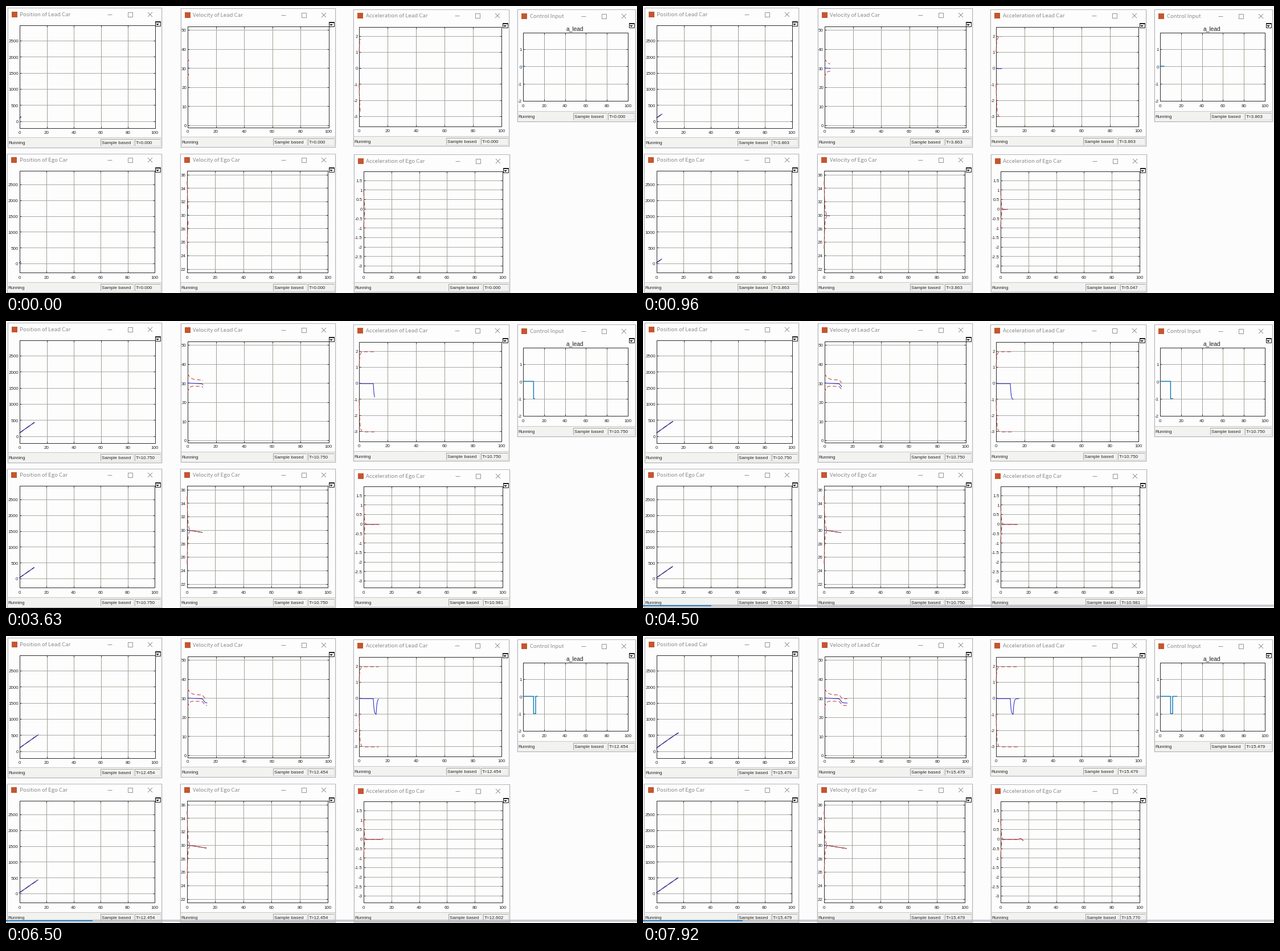
Animation of 1108x505 px, one loop 8000 ms. Source, as a matplotlib script:

```python
import numpy as np
import matplotlib.pyplot as plt
from matplotlib.animation import FuncAnimation
from matplotlib.collections import LineCollection
from matplotlib.patches import Polygon, Rectangle

W, H, DPI = 1108, 505, 100
STEP_MS, FRAMES = 80, 100
PX = 72 / DPI
SANS, UI = "Liberation Sans", "Noto Sans CJK JP"
BLUE, RED, TEAL = "#3432c4", "#c0483f", "#1f7fb8"

plt.rcParams["path.simplify"] = False
fig = plt.figure(figsize=(W / DPI, H / DPI), dpi=DPI, facecolor="#fcfcfd")
ax = fig.add_axes([0, 0, 1, 1])
ax.set_xlim(0, W)
ax.set_ylim(H, 0)
ax.axis("off")


def rect(x0, y0, x1, y1, face="none", edge="none", width=1, z=1, alpha=1):
    patch = Rectangle((x0, y0), x1 - x0, y1 - y0, fc=face, ec=edge,
                      lw=width * PX, zorder=z, alpha=alpha)
    return ax.add_patch(patch)


def text(x, y, label, size=8, color="#262626", ha="left", font=SANS):
    """Write a label with its capitals centred on y."""
    return ax.text(x, y + 0.36 * size, label, size=size * PX, color=color,
                   ha=ha, va="baseline", family=font, zorder=4)


def strokes(segments, color, width=1, z=2):
    ax.add_collection(LineCollection(segments, colors=color,
                                     linewidths=width * PX, zorder=z))


class Scope:
    """One scope window: frame, title bar, plot grid and status bar."""

    def __init__(self, title, frame, plot, ticks, title_y, label_y, status):
        x0, y0, x1, y1 = frame
        self.left, top, self.right, bottom = plot
        first, self.step, count, self.first_y, self.dy = ticks
        self.first = first
        self.draw_frame(title, frame, title_y)

        xs = np.linspace(self.left, self.right, 6)
        ys = self.first_y + self.dy * np.arange(count)
        strokes([[(x, top), (x, bottom)] for x in xs[1:-1]], "#96968a", 0.9)
        strokes([[(self.left, y), (self.right, y)] for y in ys], "#a0a098", 0.9)
        strokes([[(x, e), (x, e + d)] for x in xs
                 for e, d in ((top, 3), (bottom, -3))], "#303030")
        strokes([[(e, y), (e + d, y)] for y in ys
                 for e, d in ((self.left, 3), (self.right, -3))], "#303030")
        rect(self.left, top, self.right, bottom, edge="#2c2c2c", z=3)
        for i, x in enumerate(xs):
            text(x, label_y, str(20 * i), ha="center")
        for i, y in enumerate(ys):
            text(self.left - 2, y + 0.5, f"{first + i * self.step:g}", ha="right")

        status_y, sample_x, time_x = status
        rect(x0 + 0.5, status_y - 9, x1 - 0.5, y1 - 0.5, "#f2f2f0")
        strokes([[(x0, status_y - 9), (x1, status_y - 9)]], "#c8c8c4")
        for a, b in ((sample_x - 2, time_x - 4), (time_x - 2, x1 - 2)):
            strokes([[(a, status_y + 6), (a, status_y - 6), (b, status_y - 6)]],
                    "#a4a4a8")
            strokes([[(b, status_y - 6), (b, status_y + 6), (a, status_y + 6)]],
                    "#dcdcd8")
        text(x0 + 1, status_y, "Running")
        text(sample_x, status_y, "Sample based")
        self.clock = text(time_x, status_y, "")
        self.traces = []

    def draw_frame(self, title, frame, y):
        x0, y0, x1, y1 = frame
        rect(x0 - 1, y0, x1 + 2, y1 + 2, "#ececee")
        rect(x0, y0, x1 + 1, y1 + 1, "#dadade")
        rect(x0, y0, x1, y1, "#fdfdfd", "#b4b4ba")
        rect(x0 + 7, y - 5, x0 + 17, y + 5, "#c4562f")
        text(x0 + 21.5, y, title, 9.6, "#8c8c8c", font=UI)
        minimise, maximise, close = x1 - 91, x1 - 55.5, x1 - 20
        strokes([[(minimise - 4, y), (minimise + 4, y)],
                 [(close - 4, y - 4), (close + 4, y + 4)],
                 [(close - 4, y + 4), (close + 4, y - 4)]], "#8a8a8a", 0.9)
        rect(maximise - 4, y - 4, maximise + 4, y + 4, edge="#8a8a8a", width=0.9)
        cx, cy = x1 - 7, y0 + 28
        rect(cx - 4.5, cy - 4, cx + 4.5, cy + 4, "white", "#1c1c1c", z=4)
        rect(cx - 4.5, cy - 4, cx + 4.5, cy - 2, "#1c1c1c", z=5)
        arrow = [(cx - 3, cy), (cx + 3, cy), (cx, cy + 3)]
        ax.add_patch(Polygon(arrow, fc="#1c1c1c", lw=0, zorder=5))

    def add(self, values, color, width=1.1, dashed=False):
        x = self.left + (self.right - self.left) * TIME / 100
        y = self.first_y + (values - self.first) / self.step * self.dy
        style = (0, (6, 3.5)) if dashed else "-"
        line, = ax.plot([], [], color=color, lw=width * PX, ls=style, zorder=3.5)
        self.traces.append((line, x, y))

    def show(self, now, clock):
        for line, x, y in self.traces:
            line.set_data(np.interp(np.append(TIME[TIME < now], now), TIME, x),
                          np.interp(np.append(TIME[TIME < now], now), TIME, y))
        self.clock.set_text(f"T={clock:.3f}")


# Simulated signals: the lead car brakes for two seconds.
DT = 0.02
TIME = np.arange(0, 17, DT)


def settle(start, end, tau):
    return end + (start - end) * np.exp(-TIME / tau)


def lagged(at, tau=0.5):
    return 1 - np.exp(-np.maximum(TIME - at, 0) / tau)


command = -((TIME >= 10) & (TIME < 12)).astype(float)
lead_acc = settle(0, -0.04, 0.5) - lagged(10) + lagged(12)
lead_vel = 30 + np.cumsum(lead_acc) * DT
lead_pos = 100 + np.cumsum(lead_vel) * DT
ego_vel = 30 - 0.033 * TIME
ego_pos = 20 + np.cumsum(ego_vel) * DT
ego_acc = np.interp(TIME, [0, 1, 13, 13.8, 15, 16.5],
                    [0, -0.03, -0.03, 0, -0.01, -0.11])
braking = lead_vel - 30 + 0.04 * TIME

lead_position = Scope("Position of Lead Car", (3, 3, 273, 249), (24, 34, 261.5, 215),
                      (0, 500, 6, 202.5, -28.3), 15, 222, (240, 168, 228))
lead_velocity = Scope("Velocity of Lead Car", (307, 4, 578, 248), (319, 36, 566.5, 214),
                      (0, 10, 6, 210, -33.6), 16, 220.5, (239, 471, 532))
lead_accel = Scope("Acceleration of Lead Car", (610, 6, 883, 246), (620, 37, 870, 212),
                   (-3, 1, 6, 193.7, -28.2), 17, 219, (238, 775, 836))
control = Scope("Control Input", (898, 6, 1105, 203), (908, 47, 1092, 167),
                (-2, 1, 4, 167, -30.4), 18, 175, (194, 998, 1059))
ego_position = Scope("Position of Ego Car", (2, 260, 273, 504), (23.5, 290, 261, 469),
                     (0, 500, 6, 453, -27.8), 271, 477, (495, 168, 228))
ego_velocity = Scope("Velocity of Ego Car", (306, 260, 578, 503), (318, 290, 565, 468.5),
                     (22, 2, 8, 462.5, -23.7), 271, 477, (495, 471, 532))
ego_accel = Scope("Acceleration of Ego Car", (611, 261, 884, 503), (628, 291, 872, 468.5),
                  (-3, 0.5, 10, 457, -16.7), 273, 477, (495, 779, 840))
text(999.5, 39, "a_lead", 10.2, ha="center")

for scope, signal in ((lead_position, lead_pos), (ego_position, ego_pos)):
    scope.add(signal, "#8a3a50", 1.4, dashed=True)
    scope.add(signal, "#33289a", 1.2)
lead_velocity.add(lead_vel, BLUE)
lead_velocity.add(settle(35, 31.6, 2) + braking, RED, dashed=True)
lead_velocity.add(settle(25, 28.5, 1) - 0.03 * TIME + braking, RED, dashed=True)
lead_accel.add(lead_acc, BLUE)
lead_accel.add(settle(1, 1.95, 0.5), RED, dashed=True)
lead_accel.add(settle(-1, -3.05, 0.5), RED, dashed=True)
control.add(command, TEAL, 1.5)
ego_velocity.add(ego_vel, "#4a4a90")
ego_accel.add(ego_acc, "#6a4a80")
for sign in (1, -1):
    ego_velocity.add(ego_vel + sign * 5 * np.exp(-TIME / 0.5), RED, dashed=True)
    ego_accel.add(ego_acc + sign * np.exp(-TIME / 0.45), RED, dashed=True)

SCOPES = (lead_position, lead_velocity, lead_accel, control,
          ego_position, ego_velocity, ego_accel)

# Wall-clock seconds against simulated seconds, and status clock refreshes.
WALL = [0, 0.13, 0.96, 2.46, 3.63, 4.5, 6.5, 8]
REACHED = [1, 1, 3.9, 10, 10.9, 12, 13.7, 16.1]
REACHED_EGO = [1.3, 1.3, 5, 10, 11, 12.1, 13.85, 16.4]
REFRESH = [0, 0.88, 3.46, 5.13, 7.63]
CLOCK = [0, 3.863, 10.75, 12.454, 15.479]
CLOCK_EGO = [0, 5.047, 10.981, 12.602, 15.77]

track = rect(0, 499, W, 502.5, "#b2b2ba", z=8)
progress = rect(0, 499.5, 120, 502, "#2c86cc", z=9)


def update(frame):
    seconds = frame * STEP_MS / 1000
    tick = np.searchsorted(REFRESH, seconds, side="right") - 1
    for scope in SCOPES:
        ahead = scope is ego_accel
        scope.show(np.interp(seconds, WALL, REACHED_EGO if ahead else REACHED),
                   (CLOCK_EGO if ahead else CLOCK)[tick])
    fade = np.clip((seconds - 4.05) / 0.25, 0, 1)
    track.set_alpha(0.65 * fade)
    progress.set_alpha(fade)
    progress.set_width(120 + 16 * (seconds - 4.5))
    return []


animation = FuncAnimation(fig, update, frames=FRAMES, interval=STEP_MS,
                          repeat=True, repeat_delay=0, blit=False)
plt.show()
```
